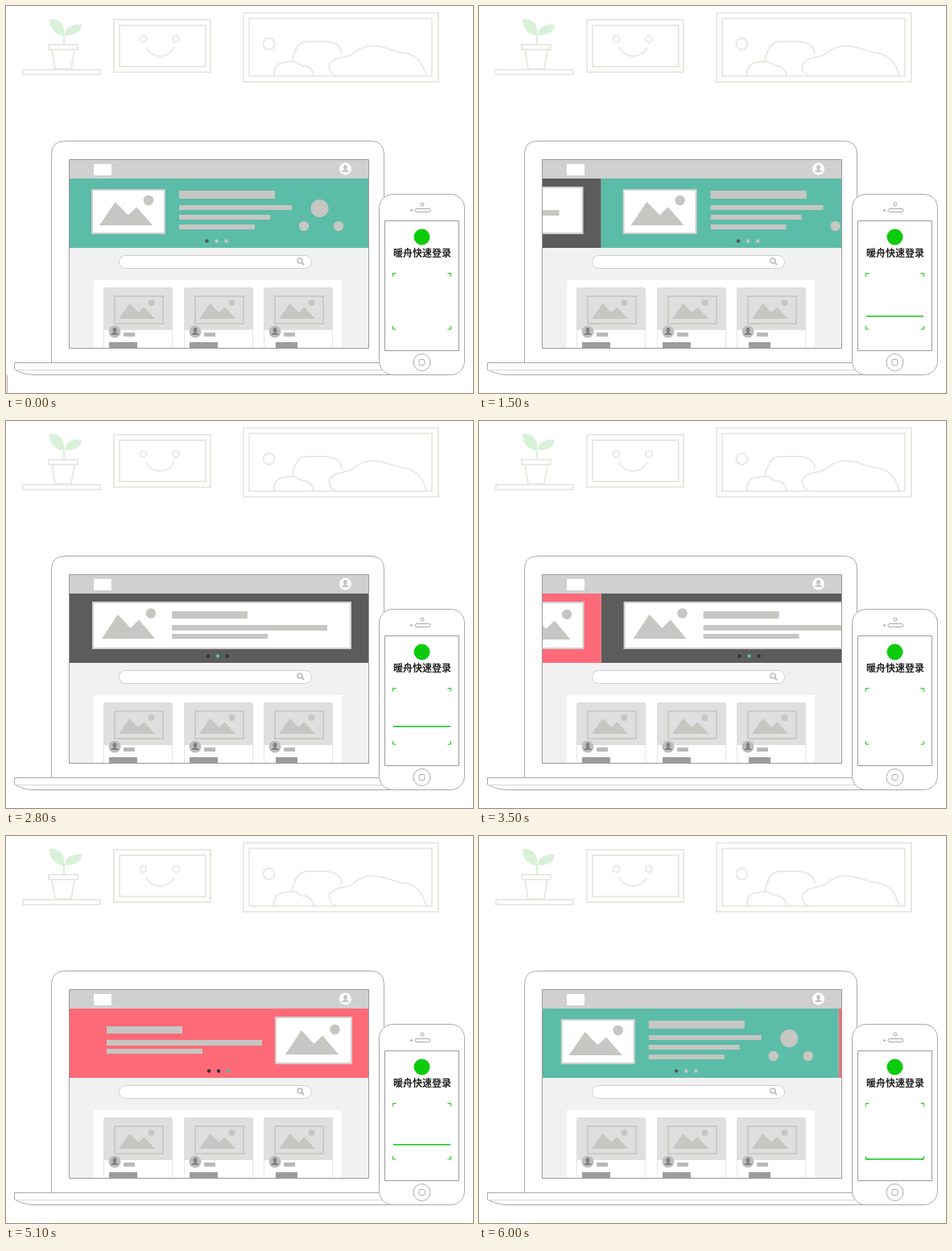
An HTML page with a canvas that plays this animation: 580 px wide and 480 px high, repeating every 6.1 s.

```html
<!DOCTYPE html>
<html lang="zh">
<head>
<meta charset="utf-8">
<style>
html, body { margin: 0; width: 100%; height: 100%; overflow: hidden; background: #fff; }
canvas { display: block; }
</style>
</head>
<body>
<canvas id="stage" width="580" height="480"></canvas>
<script>
const c = document.getElementById('stage').getContext('2d');
const LOOP = 6100, TICK = 100;
const WALL = '#e9e9e4', EDGE = '#a9a9a9', GREY = '#c6c6c2';
const TEAL = '#5bbca8', DARK = '#5c5c5c', RED = '#ff6a78', GREEN = '#0ccb0c';
const VIEW = { x: 79, y: 214, w: 372, h: 86 };

function paint(fill, stroke, width = 1) {
  if (fill) { c.fillStyle = fill; c.fill(); }
  if (stroke) { c.strokeStyle = stroke; c.lineWidth = width; c.stroke(); }
}
function box(x, y, w, h, fill, stroke, width, radius = 0) {
  c.beginPath();
  c.roundRect(x, y, w, h, radius);
  paint(fill, stroke, width);
}
function disc(x, y, r, fill, stroke, width) {
  c.beginPath();
  c.arc(x, y, r, 0, Math.PI * 2);
  paint(fill, stroke, width);
}
function shape(d, fill, stroke, width) {
  const p = new Path2D(d);
  if (fill) { c.fillStyle = fill; c.fill(p); }
  if (stroke) { c.strokeStyle = stroke; c.lineWidth = width || 1; c.stroke(p); }
}
function clipTo(x, y, w, h, draw) {
  c.save();
  c.beginPath();
  c.rect(x, y, w, h);
  c.clip();
  draw();
  c.restore();
}

// CSS "ease" curve, solved by bisection
function ease(x) {
  if (x <= 0) return 0;
  if (x >= 1) return 1;
  let lo = 0, hi = 1, s;
  for (let i = 0; i < 20; i++) {
    s = (lo + hi) / 2;
    if (0.75 * s * (1 - s) + s ** 3 < x) lo = s; else hi = s;
  }
  return 0.3 * s * (1 - s) ** 2 + 3 * s * s * (1 - s) + s ** 3;
}

function wall() {
  box(21, 79, 96, 6, null, WALL, 2);
  shape('M57 54 L61 78 H81 L85 54', null, WALL, 2);
  box(53, 48, 36, 6, '#fff', WALL, 2);
  shape('M72 47 V35', null, '#d9f1d9', 2);
  shape('M54 16 C65 15 74 21 72 37 C60 35 54 28 54 16Z', '#d9f1d9');
  shape('M94 23 C94 33 84 37 73 36 C73 27 82 22 94 23Z', '#d9f1d9');

  box(134, 17, 120, 65, null, WALL, 2);
  box(141, 24, 107, 51, null, WALL, 2);
  disc(170.5, 41, 4, null, WALL, 2);
  disc(211, 41, 4, null, WALL, 2);
  shape('M174 51 C180 66 202 66 209 51', null, WALL, 2);

  box(295, 8.5, 242, 85.5, null, WALL, 2);
  box(302, 15.5, 227, 71.5, null, WALL, 2);
  disc(326.5, 47, 7, null, WALL, 2);
  shape('M333 87 C332 75 338 70 347 70 C355 67 361 69 367 74 C376 74 381 79 382 87', null, WALL, 2);
  shape('M355 69 C357 57 363 43 374 44 H398 C410 45 417 50 417 60', null, WALL, 2);
  shape('M410 87 C401 83 398 73 406 68 C414 62 424 65 431 59 C442 49 456 48 468 51 C480 54 486 58 495 58 C511 61 519 74 522 87',
    null, WALL, 2);
}

function person(x, y, disk, figure) {
  disc(x, y, 7.5, disk);
  c.beginPath();
  c.ellipse(x, y - 2, 2.4, 3, 0, 0, Math.PI * 2);
  paint(figure);
  shape(`M${x - 5} ${y + 4} Q${x - 4} ${y + 2} ${x - 1} ${y + 1} H${x + 1} Q${x + 4} ${y + 2} ${x + 5} ${y + 4}Z`, figure);
}

function hills(x, base, w, h) {
  c.beginPath();
  [[0, 0], [0.3, 1], [0.54, 0.44], [0.7, 0.78], [1, 0]]
    .forEach(([u, v]) => c.lineTo(x + u * w, base - v * h));
  paint(GREY);
}

function bars(x, list) {
  for (const [y, w, h] of list) box(x, y, w, h, GREY);
}

function dots(x, active, on, off) {
  for (let i = 0; i < 3; i++) disc(x + i * 12, 291.5, 2.2, i === active ? on : off);
}

function picture(x, y, w, h) {
  box(x + 1, y + 1, w - 2, h - 2, '#fff', '#d0d0cd', 2);
}

const textBars = [[236, 94, 9], [253, 193, 7], [264, 119, 6]];

const slides = [
  () => {
    box(VIEW.x, VIEW.y, VIEW.w, VIEW.h, TEAL);
    picture(106, 227, 92, 56);
    hills(116, 272, 66, 29);
    disc(177, 241, 6.3, GREY);
    bars(215, [[229, 119, 10], [247, 140, 6], [259, 113, 6], [271, 94, 6]]);
    disc(389.5, 251, 11, GREY);
    disc(370, 273, 6.2, GREY);
    disc(413, 273, 6.2, GREY);
    dots(249.5, 0, '#555', GREY);
  },
  () => {
    box(VIEW.x, VIEW.y, VIEW.w, VIEW.h, DARK);
    picture(107, 224, 322, 59);
    hills(119, 270, 66, 30);
    disc(180, 238.5, 6.2, GREY);
    bars(206, textBars);
    dots(251, 1, TEAL, '#333');
  },
  () => {
    box(VIEW.x, VIEW.y, VIEW.w, VIEW.h, RED);
    picture(334, 224, 96, 59);
    hills(347, 271, 66, 30);
    disc(408.5, 240, 6.2, GREY);
    bars(125, textBars);
    dots(252, 2, TEAL, '#333');
  }
];

function banner(t) {
  const progress = [1418, 3418, 5544].reduce((sum, start) => sum + ease((t - start) / 530), 0);
  const current = Math.floor(progress), shift = (progress - current) * VIEW.w;
  const drawAt = (index, dx) => {
    c.save();
    c.translate(dx, 0);
    slides[index % 3]();
    c.restore();
  };
  clipTo(VIEW.x, VIEW.y, VIEW.w, VIEW.h, () => {
    drawAt(current, shift);
    if (shift) drawAt(current + 1, shift - VIEW.w);
  });
}

function card(x, barInset) {
  box(x + 0.5, 349.5, 85, 80, '#fff', '#e5e5e5', 1, 3);
  box(x, 349, 86, 53, '#dfdfdf', null, 0, [3, 3, 0, 0]);
  box(x + 14, 360, 60, 34, null, '#cbcbc7', 2);
  hills(x + 19, 388, 45, 19);
  disc(x + 59.5, 368, 4, GREY);
  box(x + 25, 405, 14, 5, '#b9b9b9');
  box(x + barInset, 417, 42 - barInset, 7, '#9c9c9c');
  person(x + 14, 404, '#bdbdbd', '#808080');
}

function laptop(t) {
  shape('M56.5 442 V184 Q56.5 167.5 73 167.5 H453 Q469.5 167.5 469.5 184 V442', '#fff', EDGE);
  shape('M10.5 442.5 H500 V457.5 H34 Q25 457 20 455 L10.5 451Z', '#fff', EDGE);
  shape('M11 451.5 H500', null, '#d6d6d6');
  box(79, 191, 372, 234, '#f1f1f1');
  box(79, 191, 372, 23, '#d0d0d0');
  box(109, 196, 22, 14, '#fff');
  person(421.5, 202, '#fff', '#c4c4c4');
  banner(t);

  box(140.5, 309.5, 239, 16, '#fff', '#cfcfcf', 1, 8);
  disc(365, 316, 3, null, '#bbb', 1.5);
  shape('M367 318 L370 321', null, '#bbb', 2);
  clipTo(79, 300, 372, 124, () => {
    box(109, 340, 308, 90, '#fff');
    card(121, 7);
    card(221, 7);
    card(320, 15);
  });
  box(78.5, 190.5, 372, 234, null, '#999');
}

function scanner(t) {
  for (const [x, sx] of [[480.5, 1], [552.5, -1]])
    for (const [y, sy] of [[331.5, 1], [401, -1]])
      shape(`M${x + 4 * sx} ${y} H${x} V${y + 4 * sy}`, null, GREEN);

  // The beam climbs and vanishes near the top
  const height = (t / 1190 + 0.965) % 1;
  if (height < 0.87) box(481, Math.round(400 - 70 * height), 71, 1.5, GREEN);
}

function phone(t) {
  box(463.5, 233.5, 106, 224, '#fff', EDGE, 1, 17);
  disc(517, 246, 2, null, EDGE);
  box(508, 251.5, 19, 4, null, EDGE, 1, 2);
  disc(503.5, 253.5, 1.2, '#999');
  box(470.5, 266.5, 92, 161, '#fff', '#999');
  disc(516.5, 442, 10.5, null, EDGE);
  box(513, 438.5, 7, 7, null, EDGE, 1, 2);
  disc(516.5, 286.5, 10, GREEN);
  c.fillStyle = '#222';
  c.font = 'bold 12px "Noto Sans CJK SC", "Noto Sans CJK", sans-serif';
  c.textAlign = 'center';
  c.fillText('暖舟快速登录', 517, 310.5);
  scanner(t);
}

function render(now) {
  const t = Math.floor((now % LOOP) / TICK) * TICK;
  box(0, 0, 580, 480, '#fff');
  wall();
  laptop(t);
  phone(t);
  if (t < 1500) box(1, 458, 1, 22, '#aaa');
}

let began;
function frame(now) {
  began ??= now;
  render(now - began);
  requestAnimationFrame(frame);
}
render(0);
requestAnimationFrame(frame);
</script>
</body>
</html>
```
